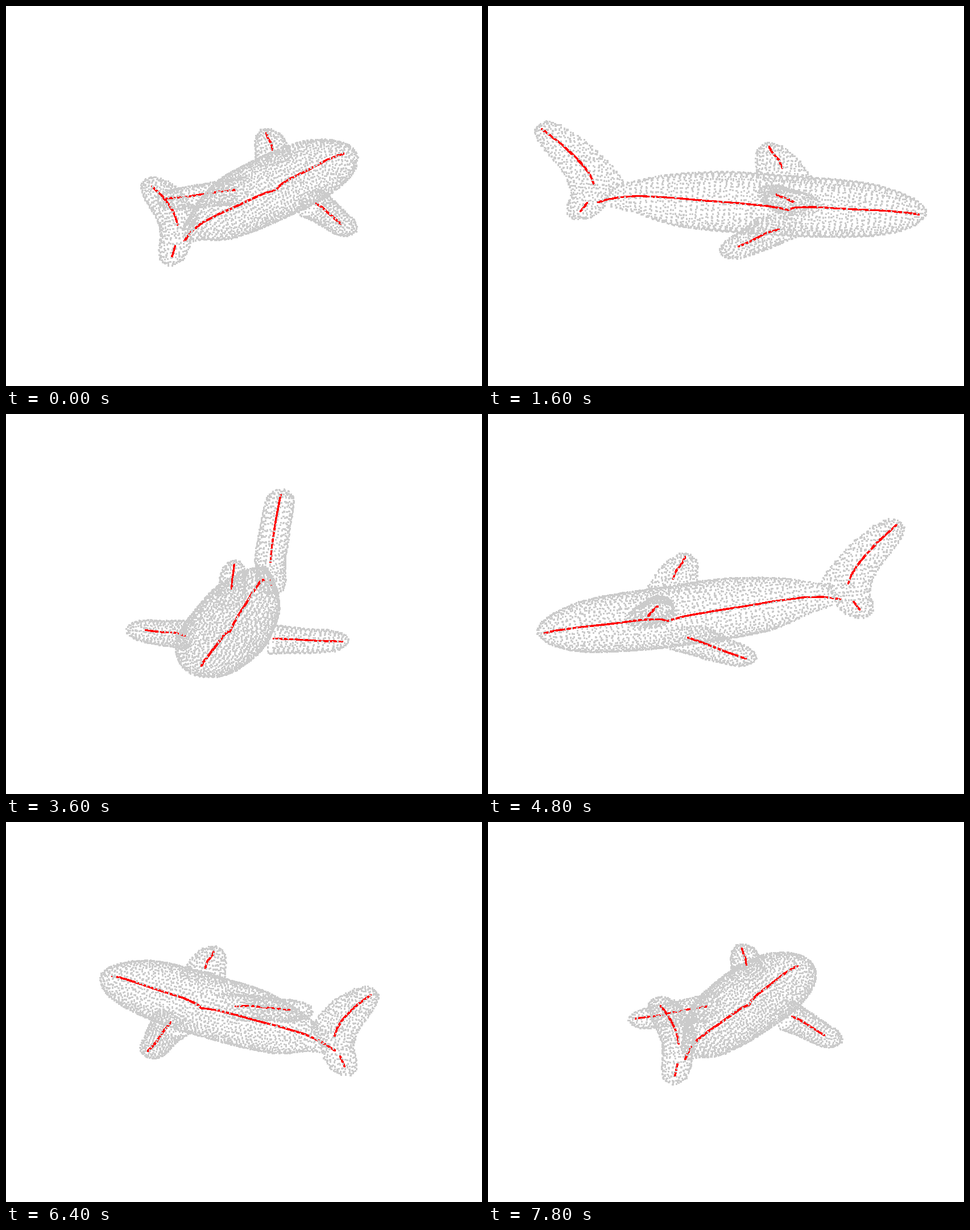
Write a matplotlib script that moves like this. It is 837 by 669 pixels and loops after 8000 ms.

```python
import numpy as np
import matplotlib.pyplot as plt
from matplotlib.animation import FuncAnimation

W, H, DPI = 837, 669, 100
FRAMES, INTERVAL = 40, 200
CENTER_X = 418
HEADING = 61            # nose direction at the start, degrees
TILT = 0.286            # sine of the camera elevation
GREY, RED = (0.797, 0.797, 0.797), (1.0, 0.0, 0.0)

rng = np.random.default_rng(7)


def ring(a, b, gap):
    """Evenly spaced points on an ellipse with half axes a and b."""
    t = np.linspace(0, 2 * np.pi, 241)
    p, q = a * np.cos(t), b * np.sin(t)
    arc = np.r_[0, np.cumsum(np.hypot(np.diff(p), np.diff(q)))]
    n = max(3, int(round(arc[-1] / gap)))
    s = (np.arange(n) + rng.normal(0, 0.13, n)) * arc[-1] / n
    t = np.interp(s % arc[-1], arc, t)
    return a * np.cos(t), b * np.sin(t)


def tube(stations, step, gap):
    """Rings along a list of (position, centre 1, centre 2, half 1, half 2)."""
    st = np.array(stations, float)
    length = np.r_[0, np.cumsum(np.hypot(np.diff(st[:, 0]),
                                         np.diff(st[:, 3])))]
    parts = []
    for s in np.linspace(0, length[-1], int(length[-1] / step) + 1):
        pos, c1, c2, a, b = (np.interp(s, length, col) for col in st.T)
        p, q = ring(a, b, gap)
        parts.append(np.c_[pos + rng.normal(0, 0.9, len(p)), c1 + p, c2 + q])
    return np.vstack(parts)


def line(points, step=1.4):
    """Dense points along a polyline."""
    p = np.array(points, float)
    s = np.r_[0, np.cumsum(np.linalg.norm(np.diff(p, axis=0), axis=1))]
    t = np.arange(0, s[-1], step)
    return np.c_[tuple(np.interp(t, s, col) for col in p.T)]


# Axes: x to the nose, y to the left flank, z downwards in screen pixels.
# Body stations: x, y, z, half width, half height
body = tube([
    (-204, -3, 345, 11, 18), (-191, -3, 345, 15, 21), (-161, -3, 343, 24, 27),
    (-120, -3, 344, 38, 38), (-79, -3, 345, 50, 45), (-18, -3, 343.5, 64, 49),
    (22, -3, 343.5, 69, 49.5), (129, -3, 345, 76, 48), (185, -4, 344.5, 76, 46.5),
    (226, -5, 344, 71, 45), (267, -5, 344, 65, 41.5), (307, -5, 345, 53, 33),
    (338, -6, 345, 36, 22), (352, -6, 344, 22, 13), (359, -6, 343, 8, 5),
], 10, 8.2)

# Upright fin stations: z, x, y, half chord, half thickness
dorsal = tube([
    (237, 80, -2, 6, 5), (241, 80, -2, 16, 12), (251, 85, -2, 29, 20),
    (262, 91, -2, 37, 22), (275, 97, -2, 42, 22), (294, 105, -2, 49, 24),
], 7.5, 7.5)[:, [1, 2, 0]]
tail = tube([
    (224, -320, 4, 7, 7), (228, -320, 4, 15, 15), (238, -313, 4, 31, 25),
    (258, -291, 4, 45, 26), (278, -271, 3, 48, 26), (300, -248, 3, 49, 27),
    (320, -234, 2, 50, 26), (345, -243, 2, 33, 25), (365, -250, 1, 33, 25),
    (380, -258, 1, 26, 20), (388, -263, 1, 12, 9),
], 8, 8)[:, [1, 2, 0]]


def side_fin(side):
    # Stations: y, x, z, half chord, half thickness
    fin = tube([
        (76, 107, 363, 49, 21), (100, 95, 366, 42, 20), (130, 78, 371, 36, 19),
        (160, 58, 375, 31, 18), (180, 50, 377, 26, 15), (192, 45, 377, 16, 9),
        (198, 43, 377, 5, 3),
    ], 7.5, 7.5)[:, [1, 0, 2]]
    fin[:, 1] = side * fin[:, 1] - 2
    return fin


bones = [
    line([(-227, -7, 356), (-212, -5, 351), (-190, -4, 346), (-155, -3, 342),
          (-90, -3, 342), (-54, -3, 343.5), (22, -3, 345), (73, -3, 347),
          (100, -3, 350), (113, -3, 352), (121, -3, 348), (135, -3, 346),
          (160, -4, 344), (226, -5, 344), (287, -6, 343), (328, -8, 344),
          (348, -8, 346)]),
    line([(-330, 2, 235), (-293, 2, 261), (-268, 2, 283), (-254, 2, 297),
          (-243, 2, 312), (-236, 2, 328)]),
    line([(-260, 0, 376), (-248, 0, 360)]),
    line([(78, -2, 243), (83, -2, 252), (96, -2, 266), (102, -2, 280)]),
    line([(111, -84, 364), (95, -105, 364), (75, -136, 370), (54, -166, 374.5)]),
    line([(108, 75, 361), (88, 112, 366), (66, 150, 373), (47, 187, 377)]),
]

skin = [body, dorsal, tail, side_fin(1), side_fin(-1)]
cloud = np.vstack(skin + bones)
n_skin = sum(map(len, skin))
colors = np.array([GREY] * n_skin + [RED] * (len(cloud) - n_skin))

# The small margin keeps the pixel size from rounding down
fig = plt.figure(figsize=((W + 0.01) / DPI, (H + 0.01) / DPI), dpi=DPI,
                 facecolor="white")
ax = fig.add_axes([0, 0, 1, 1])
ax.set_xlim(0, W)
ax.set_ylim(H, 0)
ax.axis("off")
dots = ax.scatter(cloud[:, 0], cloud[:, 1], s=(3.3 * 72 / DPI) ** 2,
                  marker="s", c=colors, linewidths=0)


def draw(i):
    a = np.radians(HEADING - 360 * i / FRAMES)
    x, y, z = cloud.T
    u = CENTER_X + x * np.cos(a) - y * np.sin(a)
    depth = x * np.sin(a) + y * np.cos(a)
    v = z - TILT * depth
    far = depth * np.sqrt(1 - TILT ** 2) + z * TILT
    order = np.argsort(-far)
    dots.set_offsets(np.c_[u, v][order])
    dots.set_facecolors(colors[order])
    return dots,


anim = FuncAnimation(fig, draw, frames=FRAMES, interval=INTERVAL,
                     repeat=True, repeat_delay=0, blit=False)
plt.show()
```
